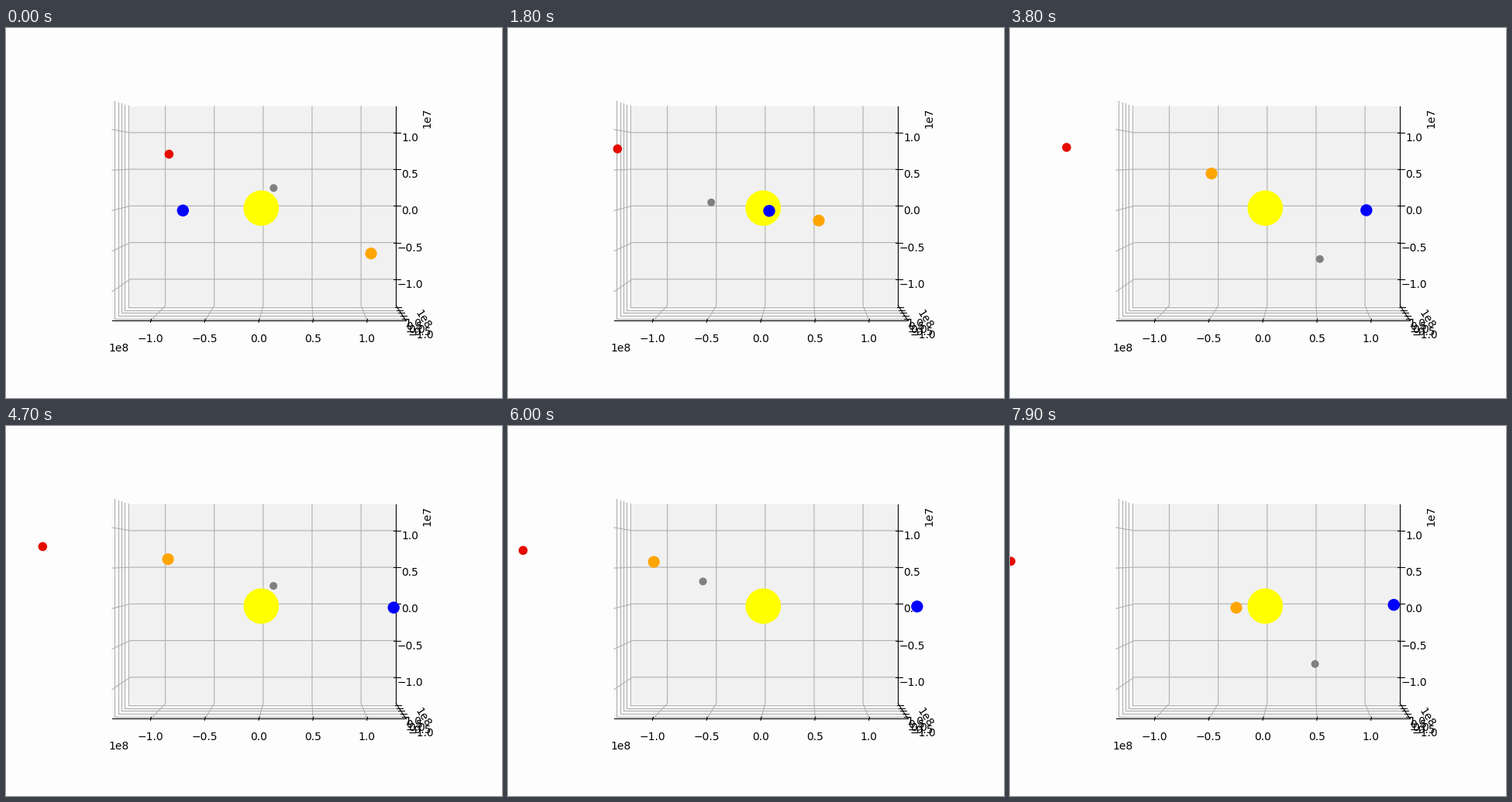
Write a matplotlib script that moves like this. It is 640 by 477 pixels and loops after 8000 ms.

```python
import numpy as np
import matplotlib.pyplot as plt
from matplotlib.animation import FuncAnimation
from matplotlib.patches import Circle, Polygon

W, H, DPI = 640, 477, 100
FRAMES, INTERVAL = 80, 100
DAYS_PER_STEP = 2

# Orbits: a (1e8 km), e, inclination, node, perihelion, start longitude,
# degrees per day, radius on screen, colour
PLANETS = [
    (0.57909, 0.20563, 7.00, 48.4, 77.49, 76.21, 4.092335, 5.0, "#808080"),
    (1.08208, 0.00677, 3.39, 76.7, 131.6, 9.07, 1.602131, 7.6, "#ffa500"),
    (1.49598, 0.01671, 0.00, 0.0, 103.0, 241.03, 0.985609, 7.7, "#0000ff"),
    (2.27940, 0.09340, 1.85, 49.6, 336.1, 106.90, 0.524033, 5.8, "#e50b00"),
]

# Playback stalls and catches up: frame number -> simulation step
CLOCK = ([0, 3, 4, 13, 18, 19, 25, 26, 27, 35, 36, 37, 38, 46, 47, 60, 64, 79],
         [0, 3, 3, 11, 16, 16, 23, 23, 25, 32, 34, 34, 35, 44, 44, 57, 62, 77])

# View: centre, pixels per unit, camera distance, box half sizes
CX, CY, SX, SZ, DIST = 329.3, 232.2, 132.6, 99.2, 27.1
BX, BY, BZ = 1.358, 1.355, 1.36
TICKS = np.arange(-1, 1.1, 0.5)


def project(x, y, z):
    """x, y in 1e8 km and z in 1e7 km to pixels; y points away from us."""
    f = DIST / (DIST + y)
    return CX + f * (SX * x + 1.95 * y), CY - f * (SZ * z + 2.2 * y)


def orbit(day, a, e, inc, node, peri, lon, rate):
    m = np.radians((lon - peri + rate * day) % 360)
    ecc = m
    for _ in range(8):
        ecc -= (ecc - e * np.sin(ecc) - m) / (1 - e * np.cos(ecc))
    r = a * (1 - e * np.cos(ecc))
    nu = 2 * np.arctan2(np.sqrt(1 + e) * np.sin(ecc / 2),
                        np.sqrt(1 - e) * np.cos(ecc / 2))
    om, i = np.radians(node), np.radians(inc)
    u = nu + np.radians(peri) - om
    x = r * (np.cos(om) * np.cos(u) - np.sin(om) * np.sin(u) * np.cos(i))
    y = r * (np.sin(om) * np.cos(u) + np.cos(om) * np.sin(u) * np.cos(i))
    return x, y, 10 * r * np.sin(u) * np.sin(i)


# The small margin keeps the height from rounding down a pixel
fig = plt.figure(figsize=(W / DPI, (H + 0.01) / DPI), dpi=DPI, facecolor="#fdfdfd")
ax = fig.add_axes([0, 0, 1, 1])
ax.set_xlim(0, W)
ax.set_ylim(H, 0)
ax.axis("off")


def pane(color, *corners):
    ax.add_patch(Polygon([project(*c) for c in corners], fc=color, ec="none", zorder=0))


def line(points, color="black", z=2):
    ax.plot(*zip(*points), color=color, lw=0.8, zorder=z)


def grid(*points):
    line([project(*p) for p in points], "#b0b0b0", 1)


def label(x, y, text, **kw):
    kw = {"ha": "center", "va": "baseline", **kw}
    ax.text(x, y, text, fontsize=10, family="DejaVu Sans", zorder=3, **kw)


def number(v):
    return f"{v:.1f}".replace("-", "\u2212")


def draw_box():
    pane("#f9f9f9", (-BX, -BY, -BZ), (-BX, BY, -BZ), (-BX, BY, BZ), (-BX, -BY, BZ))
    pane("#f7f7f7", (-BX, -BY, -BZ), (BX, -BY, -BZ), (BX, BY, -BZ), (-BX, BY, -BZ))
    pane("#f1f1f1", (-BX, BY, -BZ), (BX, BY, -BZ), (BX, BY, BZ), (-BX, BY, BZ))
    for t in TICKS:
        grid((t, -BY, -BZ), (t, BY, -BZ), (t, BY, BZ))
        grid((BX, t, -BZ), (-BX, t, -BZ), (-BX, t, BZ))
        grid((-BX, -BY, t), (-BX, BY, t), (BX, BY, t))

    near_l = project(-BX, -BY, -BZ)
    near_r = project(BX, -BY, -BZ)
    far_r = project(BX, BY, -BZ)
    line([near_l, near_r])
    line([near_r, far_r])
    line([far_r, project(BX, BY, BZ)])

    for t in TICKS:
        x, y = project(t, -BY, -BZ)
        line([(x + 0.4, y - 2), (x - 0.5, y + 2)])
        label(x - 0.6, 404.8, number(t))
        x, y = project(BX, t, -BZ)
        line([(x - 3, y), (x + 5, y)])
        label(530 - 5 * t, 392.5 - 7.5 * t, number(t))
        x, y = project(BX, BY, t)
        line([(x - 3, y), (x + 5.5, y)])
        label(521.5, y + 11, number(t))
    label(146, 417.2, "1e8")
    label(543.5, 116, "1e7", rotation=90, va="center")
    label(538, 375.5, "1e8", rotation=-57, va="center")


def ball(radius, color, z):
    c = Circle(project(0, 0, 0), radius, fc=color, ec="none", zorder=z)
    return ax.add_patch(c)


draw_box()
ball(22.8, "#ffff00", 10)
balls = [ball(p[-2], p[-1], 10) for p in PLANETS]


def update(i):
    day = DAYS_PER_STEP * np.floor(np.interp(i, *CLOCK) + 0.5)
    for b, p in zip(balls, PLANETS):
        x, y, z = orbit(day, *p[:7])
        b.center = project(x, y, z)
        b.set_zorder(10 - y)
    return balls


anim = FuncAnimation(fig, update, frames=FRAMES, interval=INTERVAL,
                     repeat=True, repeat_delay=0, blit=False)
plt.show()
```
